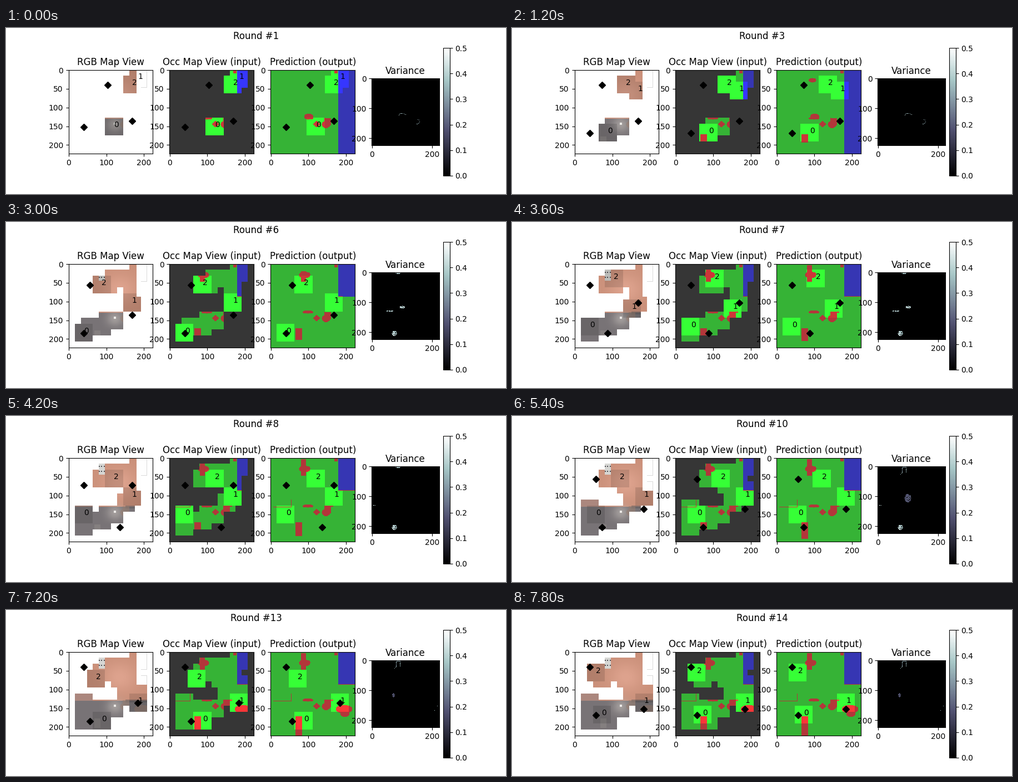
A matplotlib script that plays this animation: 900 by 300 pixels, repeating every 8 s.

```python
import numpy as np
import matplotlib.pyplot as plt
from matplotlib.animation import FuncAnimation

SIZE = 224
CELL = 16
VIEW = 24           # half width of an agent's view
STEP = 200          # ms per frame
HOLD = 3            # frames per round
FRAMES = 40
ROUNDS = 14

Y, X = np.mgrid[0:SIZE, 0:SIZE]
grain = np.random.default_rng(4).random((SIZE, SIZE))

# Key points of each path: (round, column, row); cells between are interpolated.
agent_paths = [
    [(1, 7, 9), (3, 5, 10), (4, 4, 10), (6, 2, 11), (9, 2, 8), (12, 4, 11),
     (13, 5, 11), (14, 4, 10)],
    [(1, 11, 1), (2, 10, 2), (6, 10, 6), (7, 9, 7), (9, 11, 5), (12, 11, 8)],
    [(1, 10, 2), (4, 7, 2), (5, 6, 3), (6, 5, 3), (7, 6, 2), (9, 8, 4),
     (10, 7, 3), (12, 5, 3), (13, 4, 4), (14, 3, 3)],
]
goal_paths = [
    [(1, 2, 9), (6, 2, 11), (8, 8, 11), (10, 4, 11), (12, 4, 12), (14, 3, 10)],
    [(1, 10, 8), (6, 10, 8), (8, 10, 4), (10, 11, 8), (12, 11, 8), (14, 11, 9)],
    [(1, 6, 2), (4, 3, 2), (6, 3, 3), (8, 2, 4), (10, 3, 3), (12, 3, 3),
     (14, 2, 2)],
]


def follow(path, n):
    when, col, row = np.transpose(path)
    cell = np.array([np.interp(n, when, col), np.interp(n, when, row)])
    return np.ceil(cell - 0.5) * CELL + CELL / 2


def positions(paths, n):
    return np.array([follow(path, n) for path in paths])


def box(x0, y0, x1, y1):
    return (X >= x0) & (X < x1) & (Y >= y0) & (Y < y1)


def radius(cx, cy, rx, ry):
    return np.hypot((X - cx) / rx, (Y - cy) / ry)


def disc(cx, cy, rx, ry):
    return radius(cx, cy, rx, ry) <= 1


def outline(mask):
    inner = mask.copy()
    for axis in (0, 1):
        for shift in (1, -1):
            inner &= np.roll(mask, shift, axis)
    return mask & ~inner


def window(n):
    mask = np.zeros((SIZE, SIZE), bool)
    for x, y in positions(agent_paths, n):
        mask |= box(x - VIEW, y - VIEW, x + VIEW, y + VIEW)
    return mask


# Obstacles
wall = box(180, 0, SIZE, 88)
bench = disc(99, 129, 14, 4)
dome = disc(101, 125, 12, 8)
lamp = np.abs(X - 122) + np.abs(Y - 145) <= 9
chair = box(143, 130, 160, 149) | disc(147, 146, 11, 10)
corner = box(170, 0, 179, 10)
counter = box(81, 4, 95, 49) | disc(90, 30, 15, 9)
partition = box(7, 131, 56, 133) | box(54, 112, 56, 133)
table = disc(195, 153, 22, 11) | disc(197, 163, 13, 11)
ledge = box(180, 87, SIZE, 89)
sill = box(143, 128, 166, 131)
cabinet = box(67, 173, 84, SIZE)
blocked = np.any([bench, lamp, chair, corner, counter, partition, table,
                  ledge, sill, cabinet], axis=0)


def predicted(n):
    grown = Y < np.interp(n, [4, 12], [195, SIZE])
    guesses = [
        (1, lamp | chair | corner),
        (1, dome if n < 6 else bench),
        (3, cabinet & grown),
        (3, disc(95, 28, 10, 6)),
        (5, counter & (Y > 20)),
        (7, counter | ledge),
        (8, partition),
        (11, table | sill),
    ]
    return np.any([mask for start, mask in guesses if n >= start], axis=0)


def class_image(wall_mask, red_mask, known, lit, n):
    img = np.full((SIZE, SIZE, 3), 54, np.uint8)
    img[known, 1] = 179
    img[known & lit, 1] = 255
    blue = known & wall_mask
    img[blue] = (54, 54, 179)
    if n <= 3:
        img[blue & lit] = (54, 54, 255)
    red = known & red_mask
    img[red] = (179, 54, 58)
    img[red & lit] = (250 if n >= 11 else 205, 54, 56)
    return img


def blend(img, colour, weight):
    w = weight[..., None]
    return img * (1 - w) + np.array(colour) * w


def make_scene():
    img = np.empty((SIZE, SIZE, 3))
    img[:] = (202, 144, 122)
    img = blend(img, (222, 163, 142), np.exp(-radius(135, 68, 45, 40) ** 2))
    img = blend(img, (158, 132, 128), 0.7 * box(0, 100, 64, 131))
    img = blend(img, (120, 115, 118), (Y >= 131) * 1.0)
    img = blend(img, (190, 184, 180), 0.6 * np.exp(-radius(122, 146, 22, 20) ** 2))
    img = blend(img, (96, 92, 95), 0.6 * box(150, 128, SIZE, 136))
    img = blend(img, (150, 125, 112), 0.6 * (table | chair))
    img = blend(img, (140, 136, 134), 0.6 * box(68, 178, 84, 204))
    img[lamp & disc(122, 144, 4, 3)] = (235, 233, 230)
    stove = box(80, 14, 96, 46)
    img[stove] = (214, 214, 211)
    img[stove & (np.hypot(X % 7 - 3, Y % 14 - 9) < 2)] = (80, 80, 85)
    return img


scene = make_scene()


def rgb_image(known, lit):
    img = scene.copy()
    img[lit] *= 0.88
    img[wall] = 254
    img[wall & outline(known)] = 218
    img[~known] = 255
    return img.astype(np.uint8)


# Uncertain areas: first round, last round, mask, level
uncertain = [
    (1, 5, outline(dome) & (Y < 124), 0.4),
    (1, 5, outline(disc(147, 145, 11, 9)) & (X > 148), 0.35),
    (6, 7, disc(101, 117, 9, 5) | disc(60, 130, 11, 3), 0.42),
    (6, 8, disc(87, 4, 8, 3), 0.4),
    (6, 10, disc(75, 204, 8, 9), 0.42),
    (8, 12, box(4, 131, 15, 133), 0.42),
    (9, 12, disc(100, 107, 11, 14) & (Y < 122), 0.21),
    (9, 14, outline(counter) & (Y < 30) & (X < 95), 0.35),
    (11, 14, outline(table) & (X > 203) & (Y > 150), 0.4),
    (13, 14, disc(72, 117, 5, 6), 0.2),
]


def variance_image(n):
    img = np.zeros((SIZE, SIZE))
    for first, last, mask, level in uncertain:
        if first <= n <= last:
            img[mask & (grain > 0.2)] = level
    return img * (0.7 + 0.4 * grain)


def make_rounds():
    known = np.zeros((SIZE, SIZE), bool)
    everywhere = ~known
    result = []
    for n in range(1, ROUNDS + 1):
        lit = window(n)
        known = known | lit
        guess_wall = wall if n >= 4 else X >= 180
        guess_red = predicted(n) | (blocked & known)
        result.append((
            rgb_image(known, lit),
            class_image(wall, blocked, known, lit, n),
            class_image(guess_wall, guess_red, everywhere, lit, n),
            variance_image(n),
        ))
    return result


rounds = make_rounds()

fig, axes = plt.subplots(1, 4, figsize=(9, 3), dpi=100)
heading = fig.suptitle("Round #1")
titles = ["RGB Map View", "Occ Map View (input)", "Prediction (output)", "Variance"]
images, markers, labels = [], [], []
for k, (ax, title) in enumerate(zip(axes, titles)):
    images.append(ax.imshow(rounds[0][k], cmap="bone", vmin=0, vmax=0.5,
                            interpolation="nearest"))
    ax.set_title(title)
    if k < 3:
        markers.append(ax.plot([], [], "kD", ms=6)[0])
        labels.append([ax.text(0, 0, str(i)) for i in range(3)])
        ax.set_xlim(-0.5, SIZE - 0.5)
        ax.set_ylim(SIZE - 0.5, -0.5)
fig.colorbar(images[3], ax=axes[3])


def draw(frame):
    n = frame // HOLD + 1
    heading.set_text(f"Round #{n}")
    for image, data in zip(images, rounds[n - 1]):
        image.set_data(data)
    goals = positions(goal_paths, n)
    agents = positions(agent_paths, n)
    for marker, texts in zip(markers, labels):
        marker.set_data(goals[:, 0], goals[:, 1])
        for text, pos in zip(texts, agents):
            text.set_position(pos)
    return []


anim = FuncAnimation(fig, draw, frames=FRAMES, interval=STEP,
                     init_func=lambda: draw(0), repeat=True, repeat_delay=0)
plt.show()
```
